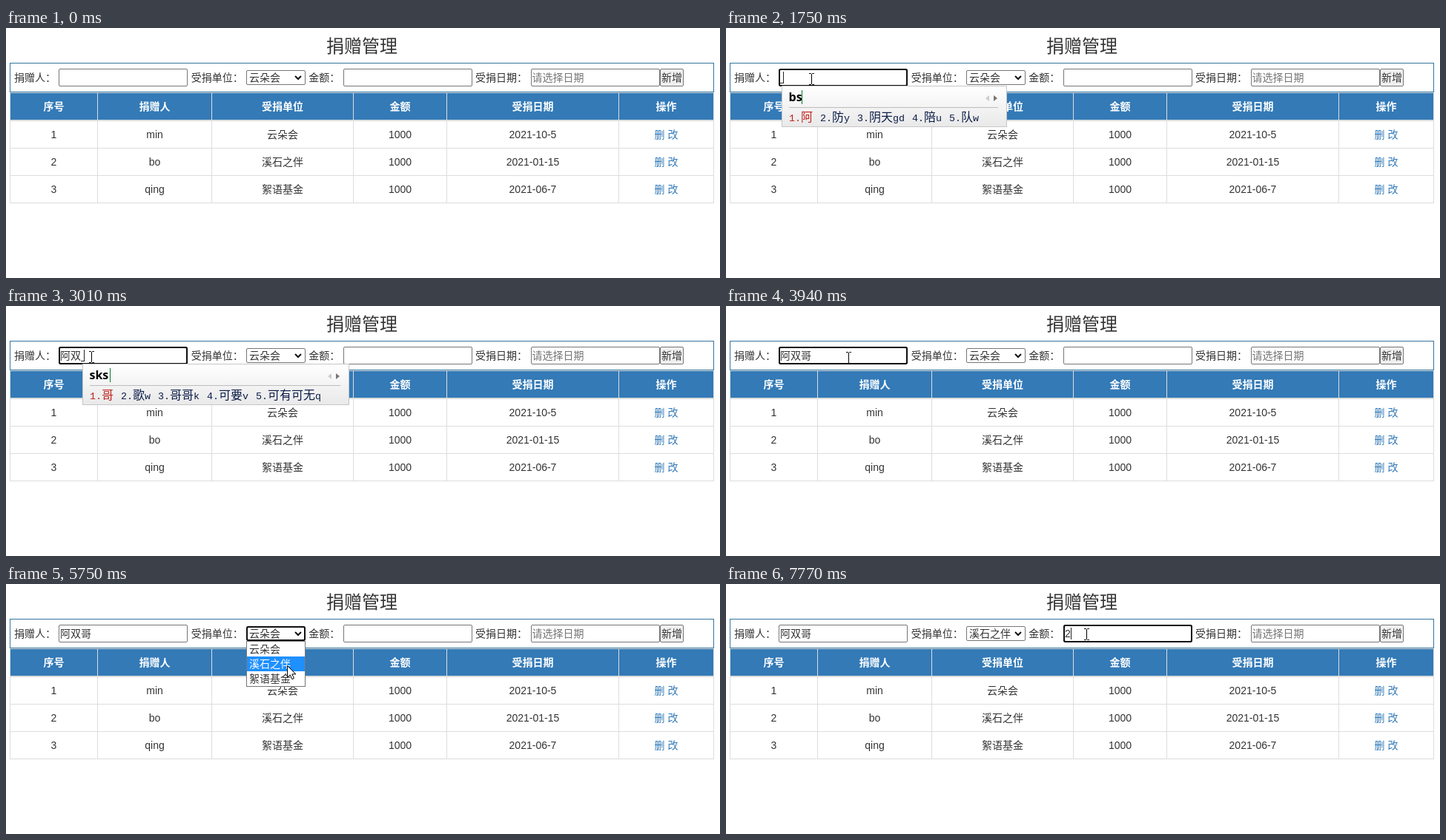
These frames come from a looping animation (963 by 338 pixels, 8000 ms). An HTML page:

```html
<!DOCTYPE html>
<html lang="zh-CN">
<head>
<meta charset="utf-8">
<title>捐赠管理</title>
<style>
html, body { margin: 0; width: 100%; height: 100%; overflow: hidden; background: #fff; }
svg { display: block; width: 963px; height: 338px; }
text { font: 14px "Liberation Sans", "Noto Sans CJK SC", "Noto Sans CJK", sans-serif; fill: #333; white-space: pre; }
.mid { text-anchor: middle; }
.title { font-size: 24px; }
.head { font-weight: 700; fill: #fff; }
.link { fill: #337ab7; }
.hint { fill: #757575; }
.white { fill: #fff; }
.code { font: 700 16px "Noto Sans", sans-serif; fill: #000; }
.cand { font-size: 16px; fill: #0c1c48; }
.first { fill: #c0221c; }
.cand tspan { font: 13.333px "Liberation Mono", monospace; }
</style>
</head>
<body>
<svg viewBox="0 0 963 338">
  <defs>
    <linearGradient id="shade" x2="0" y2="1">
      <stop stop-color="#fff"/><stop offset="1" stop-color="#e9e9e9"/>
    </linearGradient>
  </defs>
  <g id="page"></g>
  <g id="live"></g>
</svg>
<script>
const LOOP = 8000;
const page = document.getElementById('page'), live = document.getElementById('live');

const text = (x, y, s, cls = '') => `<text x="${x}" y="${y}" class="${cls}">${s}</text>`;
const rect = (x, y, w, h, fill, more = '') =>
  `<rect x="${x}" y="${y}" width="${w}" height="${h}" fill="${fill}" ${more}/>`;
const path = (d, stroke, width = 1, fill = 'none') =>
  `<path d="${d}" stroke="${stroke}" stroke-width="${width}" fill="${fill}"/>`;
const box = (x, y, w, h, fill = '#fff') =>
  rect(x + .5, y + .5, w - 1, h - 1, fill, 'rx="1.5" stroke="#767676"');
const ring = (x, y, w, h) =>
  rect(x + 1, y + 1, w - 2, h - 2, 'none', 'rx="2" stroke="#101010" stroke-width="2"');
const caret = x => rect(x, 59, 1, 16, '#222');

const cols = [5, 123, 277, 468, 594, 826, 954];
const units = ['云朵会', '溪石之伴', '絮语基金'];
const inputs = [71, 455, 708];
const rows = [
  ['1', 'min', units[0], '1000', '2021-10-5'],
  ['2', 'bo', units[1], '1000', '2021-01-15'],
  ['3', 'qing', units[2], '1000', '2021-06-7']
];
const cells = (list, y, cls) => list.map((s, i) =>
  text((cols[i] + cols[i + 1] + 1) / 2, y, s, 'mid ' + (i > 4 && !cls ? 'link' : cls))).join('');

function drawPage() {
  let s = text(480, 32.5, '捐赠管理', 'mid title');
  s += rect(5.5, 47.5, 949, 39, '#fff', 'stroke="#34769c"');
  s += text(11, 72, '捐赠人：') + text(249.7, 72, '受捐单位：') + text(408.3, 72, '金额：') + text(633, 72, '受捐日期：');
  s += inputs.map(x => box(x, 55, 174, 24)).join('') + box(324, 57, 80, 20);
  s += text(709.5, 72, '请选择日期', 'hint') + box(882, 55, 32, 24, '#efefef') + text(884, 72, '新增');
  s += rect(5, 87, 950, 38, '#337ab7') + rect(5, 124, 950, 2, '#ddd');
  s += path([87, 162, 199, 236].map(y => `M5 ${y}.5H955`).join('') + cols.map(x => `M${x}.5 87V237`).join(''), '#ddd');
  s += cells(['序号', '捐赠人', '受捐单位', '金额', '受捐日期', '操作'], 111, 'head');
  rows.forEach((r, i) => s += cells([...r, '删 改'], 149 + 37 * i, ''));
  page.innerHTML = s;
}

// start, end, typed keys, candidates
const popups = [
  [1750, 1970, 'bs', '阿 防y 阴天gd 陪u 队w'],
  [2530, 2620, 'c', '以 又 对f 通过efp 能e'],
  [2620, 2680, 'cc', '双 双方y 对对f 双双c 能干ef'],
  [2850, 2930, 's', '要 可 本g 相当hiv 林s'],
  [2930, 3010, 'sk', '可 哥sk 可以nyw 要求fi 可是jgh'],
  [3010, 3090, 'sks', '哥 歌w 哥哥k 可要v 可有可无q']
];

function popup(x, keys, words) {
  let at = x + 10, list = '';
  words.split(' ').forEach((word, i) => {
    const s = `${i + 1}.${word}`;
    list += text(at, 126, s.replace(/[!-~]+/g, m => `<tspan>${m}</tspan>`), i ? 'cand' : 'cand first');
    for (const c of s) at += c < '\x7f' ? 8 : 16;
    at += 10;
  });
  const right = at + 28, end = x + 10 + [...keys].reduce((w, c) => w + (c === 'k' ? 10 : 8.4), 0);
  return rect(x + .5, 78.5, right - x - 1, 55, 'url(#shade)', 'stroke="#c6c6c6"') +
    text(x + 9.5, 99, keys, 'code') + rect(Math.round(end), 84, 1, 19, '#087a2c') +
    path(`M${x + 10} 107.5H${right - 12}`, '#bdbdbd') +
    path(`M${right - 24} 91v8l-5-4z`, 'none', 0, '#ccc') +
    path(`M${right - 18} 91v8l5-4z`, 'none', 0, '#777') + list;
}

// start, end, steps, points along the way
const moves = [
  [180, 970, 11, [736, 320], [420, 200], [180, 85], [118, 70]],
  [1060, 1120, 2, [117, 70], [115, 69]],
  [3640, 3710, 2, [124, 69], [139, 68]],
  [3940, 4430, 7, [165, 70], [280, 85], [393, 78]],
  [4580, 4730, 3, [397, 74], [397, 68], [395, 65]],
  [5430, 6060, 9, [394, 70], [385, 95], [373, 124], [371, 116]],
  [6230, 6231, 2, [369, 114], [369, 114]],
  [6370, 6970, 9, [369, 114], [425, 104], [474, 86], [480, 74], [482, 67]],
  [7140, 7141, 2, [486, 68], [486, 68]]
];

function pointer(t) {
  const move = moves.filter(m => m[0] <= t).pop();
  if (!move) return null;
  const [start, end, steps, ...pts] = move, n = steps - 1;
  const k = Math.min(n, Math.floor((t - start) / (end - start) * n + 1e-6));
  const pos = k / n * (pts.length - 1), i = Math.min(Math.floor(pos), pts.length - 2), u = pos - i;
  return [0, 1].map(a => Math.round(pts[i][a] + (pts[i + 1][a] - pts[i][a]) * u));
}

function drawPointer([x, y]) {
  const overInput = y >= 55 && y < 79 && inputs.some(l => x >= l && x < l + 174);
  return overInput
    ? path(`M${x - 3} ${y - 7.5}h2.5l1 1l1-1h2.5M${x + .5} ${y - 7}v14M${x - 3} ${y + 7.5}h2.5l1-1l1 1h2.5`, '#000')
    : path(`M${x + .5} ${y + .5}v16l3.8-3.6l2.5 5.8l2.6-1.1l-2.5-5.7h5z`, '#000', 1, '#fff');
}

function frame(t) {
  const at = pointer(t), between = (a, b) => t >= a && t < b;
  const count = (t >= 1970) + (t >= 2680) + (t >= 3090);
  const nameEnd = 73 + 14 * count;
  const ime = popups.find(p => between(p[0], p[1]));
  const open = between(4890, 6370);
  let s = text(73, 72, '阿双哥'.slice(0, count));
  s += text(328, 72, units[t >= 6370 ? 1 : 0]) + path('M390 65l4 4l4-4', '#111', 2);

  if (between(970, 4890)) {
    s += ring(71, 55, 174, 24);
    if (ime) s += rect(nameEnd, 74, 4, 1, '#222') + caret(nameEnd + 4);
    else if (!between(1600, 1750) && !between(3640, 4140) && t < 4640) s += caret(nameEnd);
  }
  if (between(4890, 6970)) s += ring(324, 57, 80, 20);
  if (t >= 6970) {
    s += ring(455, 55, 174, 24);
    if (t >= 7770) s += text(457, 72, '2') + caret(465);
    else if (t < 7600) s += caret(457);
  }
  if (open) {
    const hover = Math.max(0, Math.min(2, Math.floor((at[1] - 78) / 20)));
    s += rect(324.5, 77.5, 79, 61, '#fff', 'stroke="#767676"') + rect(325, 78 + 20 * hover, 78, 20, '#1e90ff');
    s += units.map((u, i) => text(328, 93 + 20 * i, u, i === hover ? 'white' : '')).join('');
  }
  if (ime) s += popup(nameEnd + 2, ime[2], ime[3]);
  return at ? s + drawPointer(at) : s;
}

let last = null;
function tick() {
  const s = frame(performance.now() % LOOP);
  if (s !== last) live.innerHTML = last = s;
  requestAnimationFrame(tick);
}
drawPage();
tick();
</script>
</body>
</html>
```
